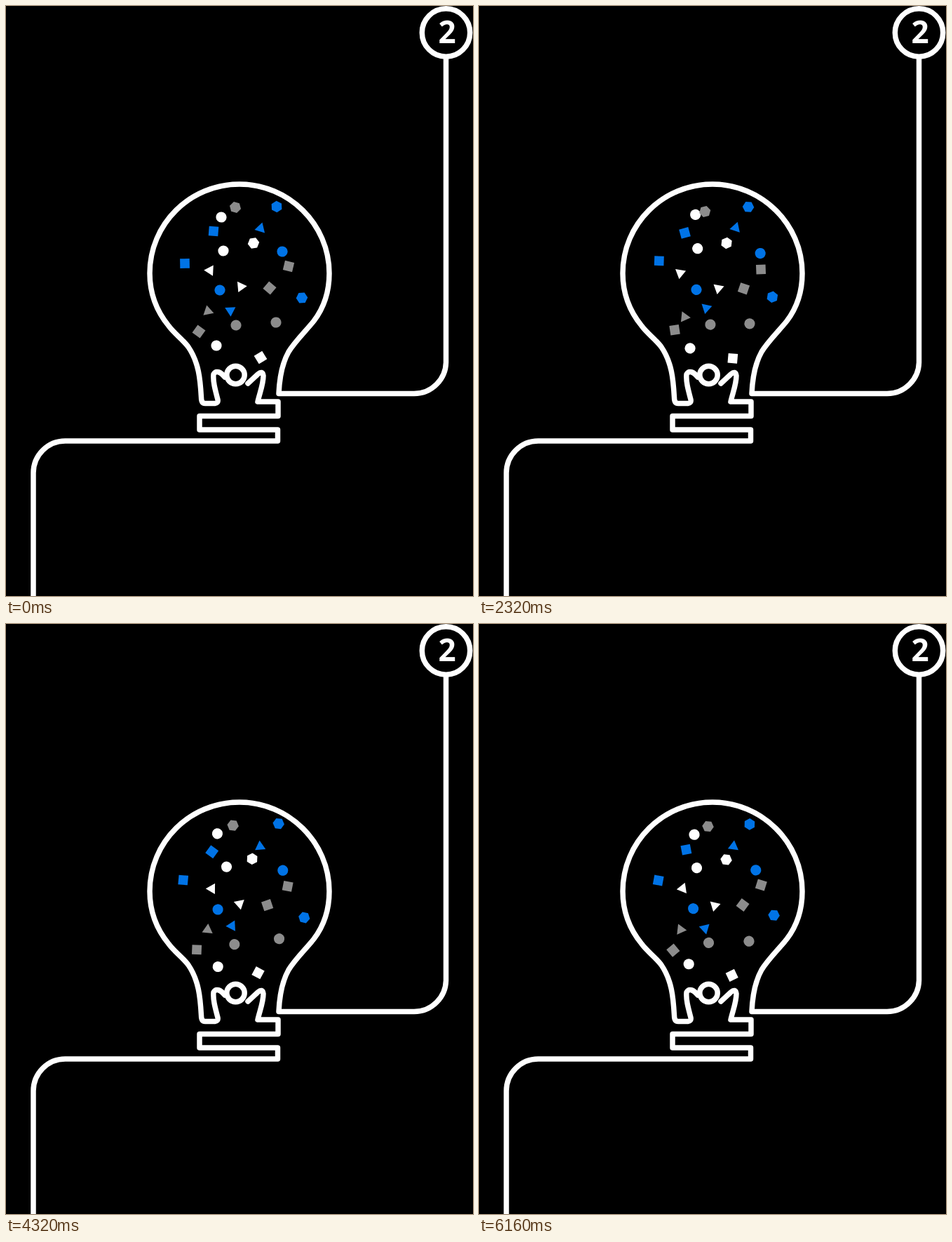
An HTML page for the animation above (6200 ms loop, 666 by 841 pixels).

```html
<!DOCTYPE html>
<html lang="en">
<head>
<meta charset="utf-8">
<title>Light bulb</title>
<style>
  html, body { margin: 0; width: 100%; height: 100%; overflow: hidden; background: #000; }
  svg { display: block; width: 666px; height: 841px; }
  .line { fill: none; stroke: #fff; stroke-width: 7.5; stroke-linecap: round; stroke-linejoin: round; }
  text { font: 700 44px "Open Sans", "Noto Sans", sans-serif; fill: #fff; text-anchor: middle; }
</style>
</head>
<body>
<svg viewBox="0 0 666 841">
  <rect width="666" height="841"/>
  <g id="confetti"></g>
  <g class="line">
    <circle cx="627.5" cy="38" r="34.2"/>
    <path d="M627.5 73V507A45.5 45.5 0 0 1 582 552.5H389
      C390 530 394 509 403 493C412 478 427 464 439 449C455 428 461 405 461 381
      C461 311 403 254 333 254C262 254 205 311 205 381C205 408 214 434 232 456
      C241 468 252 475 260 486C275 508 277 532 278.5 558
      Q278.5 566.5 284 566.5H298Q303 566 302 561C298 546 295 535 296 525
      C299 519 306 521 312 529"/>
    <circle cx="327.5" cy="526" r="12.7"/>
    <path d="M345 538L359 525Q366 519 367 527C367 539 362 551 359 564H388V584.5H276V604H387.5V620H84.5
      A45.5 45.5 0 0 0 39 665.5V850"/>
  </g>
  <text x="629" y="53">2</text>
</svg>
<script>
const LOOP = 6200, TICK = 40, TAU = Math.PI * 2;
const WHITE = '#fff', BLUE = '#0073e6', GRAY = '#8c8c8c';
const RADIUS = { 0: 7.6, 3: 8.8, 4: 9.6, 6: 8.3 };

// Resting points by shape; sides 0 means a circle
const groups = [
  { sides: 0, fill: WHITE, at: [[307, 301], [310, 349], [300, 484]] },
  { sides: 0, fill: BLUE, at: [[394, 350], [305, 405]] },
  { sides: 0, fill: GRAY, at: [[328, 455], [385, 451]] },
  { sides: 6, fill: WHITE, at: [[353, 338]] },
  { sides: 6, fill: BLUE, at: [[386, 286], [422, 416]] },
  { sides: 6, fill: GRAY, at: [[327, 287]] },
  { sides: 4, fill: WHITE, at: [[363, 501]] },
  { sides: 4, fill: BLUE, at: [[296, 321], [255, 367]] },
  { sides: 4, fill: GRAY, at: [[403, 371], [376, 402], [275, 464]] },
  { sides: 3, fill: WHITE, at: [[291, 377], [335, 400]] },
  { sides: 3, fill: BLUE, at: [[320, 434], [363, 317]] },
  { sides: 3, fill: GRAY, at: [[288, 435]] }
];

let seed = 7;
const spread = size => {
  seed = seed * 16807 % 2147483647;
  return (seed / 2147483647 * 2 - 1) * size;
};

// Seeded wiggle that starts and ends the loop at zero
function makeWiggle(size) {
  const waves = [1, 3, 5, 7].map(turns => ({ turns, amp: spread(size) }));
  return p => waves.reduce((sum, w) => sum + w.amp * Math.sin(TAU * w.turns * p), 0);
}

function polygonPoints(sides) {
  return Array.from({ length: sides }, (_, i) => {
    const a = i / sides * TAU;
    return [RADIUS[sides] * Math.cos(a), RADIUS[sides] * Math.sin(a)].map(v => v.toFixed(2));
  }).join(' ');
}

function makeNode(sides, fill) {
  const tag = sides ? 'polygon' : 'circle';
  const node = document.createElementNS('http://www.w3.org/2000/svg', tag);
  if (sides) node.setAttribute('points', polygonPoints(sides));
  else node.setAttribute('r', RADIUS[0]);
  node.setAttribute('fill', fill);
  return document.getElementById('confetti').appendChild(node);
}

const shapes = groups.flatMap(({ sides, fill, at }) => at.map(([x, y]) => ({
  node: makeNode(sides, fill),
  x, y,
  angle: spread(180),
  driftX: makeWiggle(4),
  driftY: makeWiggle(4),
  turn: makeWiggle(40)
})));

function draw(t) {
  const p = t / LOOP;
  for (const s of shapes) {
    const x = s.x + s.driftX(p), y = s.y + s.driftY(p), angle = s.angle + s.turn(p);
    s.node.setAttribute('transform',
      `translate(${x.toFixed(2)} ${y.toFixed(2)}) rotate(${angle.toFixed(2)})`);
  }
}

const start = performance.now();
function frame() {
  const t = (performance.now() - start) % LOOP;
  draw(Math.floor(t / TICK) * TICK);
  requestAnimationFrame(frame);
}
frame();
</script>
</body>
</html>
```
